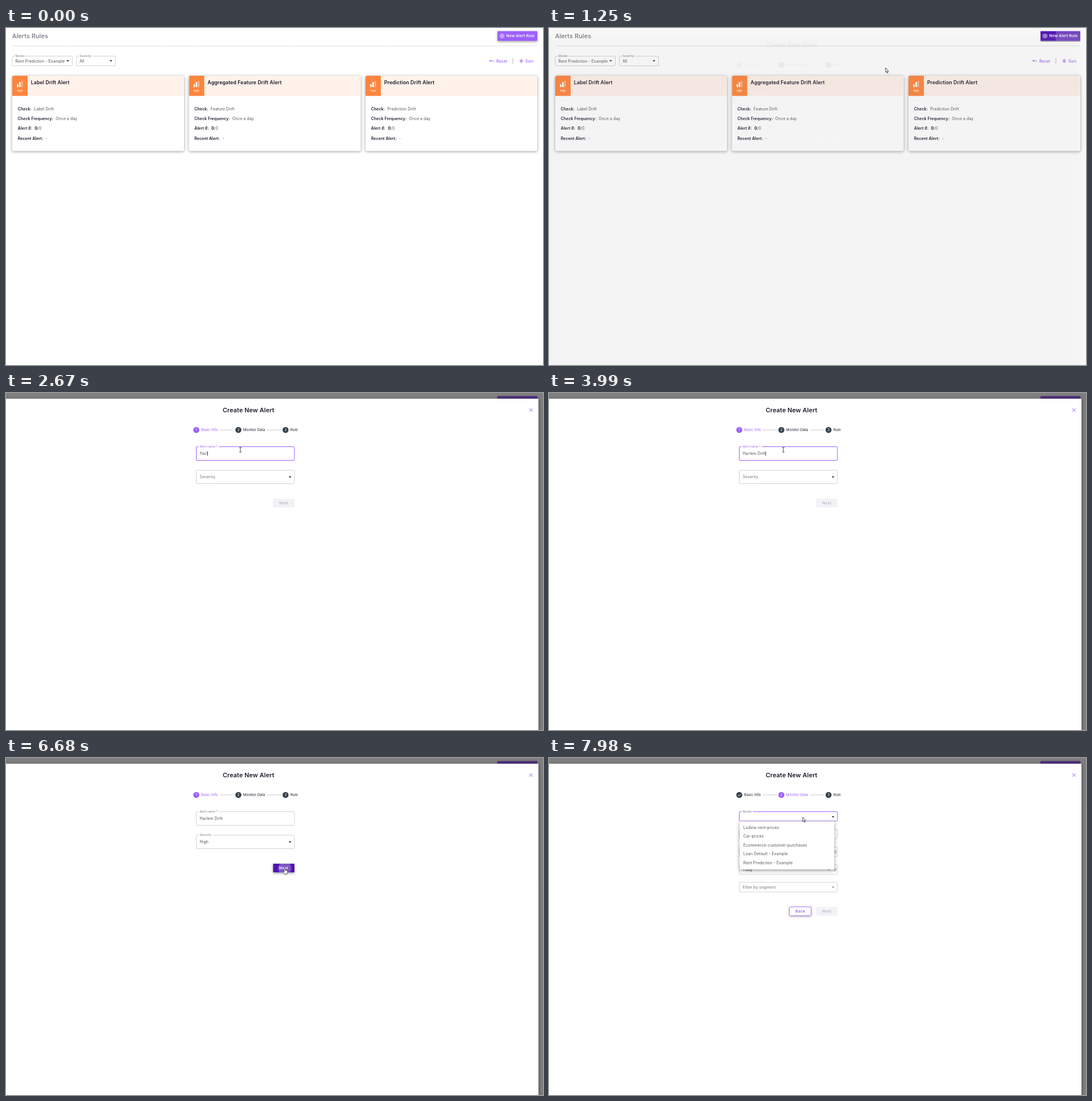
An HTML page with a canvas for the animation above (8 s loop, 944 px wide and 593 px high).

```html
<!DOCTYPE html>
<html lang="en">
<head>
<meta charset="utf-8">
<title>Alert rules</title>
<style>
html, body { margin: 0; width: 100%; height: 100%; overflow: hidden; background: #fff; }
canvas { display: block; }
</style>
</head>
<body>
<canvas id="stage" width="944" height="593"></canvas>
<script>
const ctx = document.getElementById('stage').getContext('2d');
const LOOP = 8000;
const PURPLE = '#9d60fb', DEEP = '#5014ae', INK = '#1f1b2d', BODY = '#55525c', MUTED = '#78747f', LINE = '#c9c7cd';

const progress = (t, start, length) => Math.min(1, Math.max(0, (t - start) / length));
const smooth = p => p * p * (3 - 2 * p);
const easeOut = p => 1 - (1 - p) ** 3;

// y is the middle of the capitals
function text(str, x, y, { size = 6.9, color = BODY, weight = 400, align = 'left', spacing = 0.1 } = {}) {
  ctx.font = `${weight} ${size}px Inter, sans-serif`;
  ctx.letterSpacing = spacing + 'px';
  ctx.textAlign = align;
  ctx.fillStyle = color;
  ctx.fillText(str, x, y + size * 0.365);
  return ctx.measureText(str).width;
}
function box(x, y, w, h, { fill, stroke, r = 1.5, line = 0.8, shadow = 0, drop = 1 } = {}) {
  ctx.save();
  ctx.beginPath();
  ctx.roundRect(x, y, w, h, r);
  if (shadow) {
    ctx.shadowColor = 'rgba(0,0,0,.4)';
    ctx.shadowBlur = shadow;
    ctx.shadowOffsetY = drop;
  }
  if (fill) { ctx.fillStyle = fill; ctx.fill(); }
  ctx.shadowColor = 'transparent';
  if (stroke) { ctx.strokeStyle = stroke; ctx.lineWidth = line; ctx.stroke(); }
  ctx.restore();
}
function path(d, x, y, { fill, stroke, line = 0.8 } = {}) {
  const shape = new Path2D(d);
  ctx.save();
  ctx.translate(x, y);
  if (fill) { ctx.fillStyle = fill; ctx.fill(shape); }
  if (stroke) { ctx.strokeStyle = stroke; ctx.lineWidth = line; ctx.stroke(shape); }
  ctx.restore();
}
function circle(x, y, r, style) { box(x - r, y - r, 2 * r, 2 * r, { r, ...style }); }
function caretDown(x, y, color = INK, up = false) {
  path(up ? 'M-2.4 1.2H2.4L0-1.2Z' : 'M-2.4-1.2H2.4L0 1.2Z', x, y, { fill: color });
}

// Solid button with hover shade and click ripple
function button(x, y, w, h, hover, ripple, shadow) {
  box(x, y, w, h, { fill: PURPLE, r: 1, shadow, drop: 1.5 });
  ctx.save();
  ctx.beginPath();
  ctx.rect(x, y, w, h);
  ctx.clip();
  ctx.globalAlpha *= hover;
  box(x, y, w, h, { fill: DEEP, r: 1 });
  ctx.restore();
  if (ripple && ripple.r > 0) {
    ctx.save();
    ctx.beginPath();
    ctx.rect(x, y, w, h);
    ctx.clip();
    ctx.globalAlpha *= ripple.alpha;
    circle(ripple.x, ripple.y, ripple.r, { fill: '#fff' });
    ctx.restore();
  }
}

function filter(x, w, label, value) {
  box(x, 49.5, w, 17, { stroke: LINE });
  box(x + 4, 48, label.length * 2.7 + 3, 3, { fill: '#fff', r: 0 });
  text(label, x + 5.5, 49.2, { size: 5.2, color: MUTED });
  text(value, x + 5.5, 58);
  caretDown(x + w - 8, 58);
}

function card(x, name, check) {
  box(x, 84, 302, 132.5, { fill: '#fff', r: 3, shadow: 5 });
  ctx.save();
  ctx.beginPath();
  ctx.roundRect(x, 84, 302, 132.5, 3);
  ctx.clip();
  box(x, 84, 302, 35.5, { fill: '#fff2ea', r: 0 });
  box(x, 84, 27, 35.5, { fill: '#ff853e', r: 0 });
  ctx.restore();
  box(x + 8.3, 99, 2.6, 5, { fill: '#fff', r: 0.6 });
  box(x + 12, 95, 2.8, 9, { fill: '#fff', r: 0.6 });
  box(x + 16, 93, 2.4, 11, { fill: '#ffb78f', r: 0.6 });
  text('high', x + 13.5, 110.3, { size: 4.2, color: '#fff', weight: 600, align: 'center' });
  text(name, x + 32.8, 95.5, { size: 8.75, color: INK, weight: 600 });
  [['Check:', check], ['Check Frequency:', 'Once a day'], ['Alert #:', '0'], ['Recent Alert:', '-']].forEach(([key, value], i) => {
    const y = 142.2 + i * 17.3;
    const left = x + 14.2 + text(key, x + 9.8, y, { color: INK, weight: 600 });
    const w = text(value, left, y, i === 2 ? { color: INK, weight: 700 } : {});
    if (i === 2) text('/0', left + w, y);
  });
}

function rulesPage(t) {
  box(0, 0, 944, 593, { fill: '#fff', r: 0 });
  text('Alerts Rules', 10.7, 14, { size: 10.9, color: MUTED, weight: 500 });
  ctx.setLineDash([1.6, 1]);
  path('M11 0H934', 0, 31.6, { stroke: '#bdbbc1', line: 0.7 });
  ctx.setLineDash([]);

  const hover = progress(t, 740, 160) * (1 - progress(t, 1240, 160));
  const ripple = { x: 928, y: 14, r: 73 * smooth(progress(t, 970, 550)), alpha: 0.2 * (1 - progress(t, 1250, 200)) };
  button(864, 5.5, 70, 17, hover, ripple, 4 * (1 - hover) + 0.5);
  circle(872, 14, 3.4, { stroke: '#fff', line: 0.9 });
  path('M-1.8 0H1.8M0-1.8V1.8', 872, 14, { stroke: '#fff', line: 0.9 });
  text('New Alert Rule', 879.6, 14, { size: 6.6, color: '#fff', weight: 600, spacing: 0.18 });

  filter(11, 105.5, 'Model', 'Rent Prediction - Example');
  filter(123.7, 68.8, 'Severity', 'All');
  path('M-3.2-2V.3H-.8M-3.2.3Q1-3 3.6 2', 854, 58, { stroke: PURPLE, line: 1 });
  text('Reset', 862, 58, { color: PURPLE, weight: 500 });
  path('M0-5V5', 891, 58, { stroke: '#aaa7b0' });
  path('M-2.4-.8L0-3.3L2.4-.8ZM-2.4.8L0 3.3L2.4.8Z', 905.8, 58, { stroke: PURPLE, line: 0.9 });
  text('Sort', 913, 58, { color: PURPLE, weight: 500 });

  card(11, 'Label Drift Alert', 'Label Drift');
  card(321.5, 'Aggregated Feature Drift Alert', 'Feature Drift');
  card(632, 'Prediction Drift Alert', 'Prediction Drift');
}

// raised: 0 puts the label inside the field, 1 on its top edge
function field(y, h, label, { value = '', raised = value ? 1 : 0, focus = false, labelColor = MUTED, arrow, up, fill } = {}) {
  box(334.5, y, 172.5, h, { stroke: focus ? PURPLE : LINE, fill, line: focus ? 1 : 0.8 });
  const size = 6.9 - 1.7 * raised;
  const middle = y + h / 2 + 0.2;
  if (raised > 0.9) {
    ctx.font = `400 ${size}px Inter, sans-serif`;
    ctx.letterSpacing = '.1px';
    box(338.5, y - 1, ctx.measureText(label).width + 4, 2, { fill: '#fff', r: 0 });
  }
  text(label, 340.4, middle + (y - 0.4 - middle) * raised, { size, color: labelColor });
  const w = value ? text(value, 340.4, middle) : 0;
  if (arrow) caretDown(499.3, middle, arrow, up);
  return 340.4 + w;
}

function stepper(second) {
  path('M376 0H400M459 0H483', 0, 65, { stroke: '#bdbdbd' });
  [[334.5, 'Basic Info'], [408.5, 'Monitor Data'], [491.4, 'Rule']].forEach(([x, label], i) => {
    const active = i === (second ? 1 : 0);
    circle(x, 65, 5.3, { fill: active ? PURPLE : '#35414b' });
    if (second && i === 0) path('M-2.4 0L-.7 1.8L2.5-1.7', x, 65, { stroke: '#fff', line: 1 });
    else text(i + 1, x, 65, { size: 6, color: '#fff', align: 'center', spacing: 0 });
    text(label, x + 8.6, 65.2, { size: 6.2, color: active ? PURPLE : INK, spacing: 0.05 });
  });
}

function menu(y, w, h, first, items, shades, open) {
  if (open <= 0) return;
  ctx.save();
  ctx.globalAlpha *= open;
  ctx.translate(335 + w / 2, y);
  ctx.scale(0.75 + 0.25 * open, 0.56 + 0.44 * open);
  ctx.translate(-335 - w / 2, -y);
  box(335, y, w, h, { fill: '#fff', shadow: 6, drop: 2 });
  items.forEach((item, i) => {
    const middle = first + 15.5 * i;
    if (shades[i]) box(335, middle - 8, w, 15.5, { fill: shades[i], r: 0 });
    text(item, 341.7, middle);
  });
  ctx.restore();
}

const NAME = 'Harlem Drift';
const KEY_TIMES = [2270, 2400, 2540, 2670, 2870, 3010, 3140, 3520, 3720, 3810, 3900, 3990];

function disabledNext(y) {
  box(469.5, y, 37.5, 15.2, { fill: '#f3f2f6', r: 1 });
  text('Next', 488.4, y + 7.8, { size: 6.6, color: '#b8b5c0', weight: 600, align: 'center', spacing: 0.3 });
}

function basicInfo(t) {
  const nameFocus = t >= 1740 && t < 4900;
  const typed = NAME.slice(0, KEY_TIMES.filter(k => k <= t).length);
  const end = field(94.5, 24, 'Alert name *', {
    value: typed, raised: easeOut(progress(t, 1740, 200)), focus: nameFocus, labelColor: nameFocus ? PURPLE : MUTED
  });
  if (nameFocus) path('M0-4V4', end + 0.3, 106.5, { stroke: INK, line: 0.7 });

  const chosen = t >= 5640;
  const menuOpen = t >= 4950 && !chosen;
  field(136, 23.5, 'Severity', {
    value: chosen ? 'High' : '', raised: easeOut(progress(t, 4950, 200)),
    focus: t >= 4950 && t < 6400, arrow: INK, up: menuOpen
  });

  if (chosen) {
    const ripple = { x: 490, y: 194, r: 22.5 * smooth(progress(t, 6400, 550)), alpha: 0.27 };
    button(469.5, 186, 37.5, 15.2, progress(t, 6300, 200), ripple, 4);
    text('Next', 488.4, 193.8, { size: 6.6, color: '#fff', weight: 600, align: 'center', spacing: 0.3 });
  } else disabledNext(186);

  const shades = ['#dedede', t > 5310 && t < 5480 ? '#f4f4f4' : '', t > 5430 ? '#f4f4f4' : ''];
  const open = chosen ? 1 - progress(t, 5640, 200) : easeOut(progress(t, 4950, 300));
  menu(162, 173, 67, 170.5, ['Low', 'Mid', 'High', 'Critical'], shades, open);
}

function monitorData(t) {
  const opened = t >= 7600;
  field(94.5, 16.5, 'Model', { raised: easeOut(progress(t, 7600, 200)), focus: opened, arrow: INK, up: opened });
  field(125.5, 16.5, 'Check', { arrow: MUTED });
  [['Frequency', 156.7], ['Aggregation window', 187.9]].forEach(([label, y]) => {
    field(y, 17, label, { value: '1 day' });
    circle(502.5, y + 8.5, 2.5, { stroke: MUTED, line: 0.7 });
    path('M0-1.4V0H1', 502.5, y + 8.5, { stroke: MUTED, line: 0.7 });
    path('M-1.6-1.6L1.6 1.6M1.6-1.6L-1.6 1.6', 492, y + 8.5, { stroke: MUTED });
  });
  field(218.8, 17, 'Filter by segment', { arrow: '#8d8a93' });
  box(422.7, 262, 38, 15.5, { fill: '#fff', stroke: PURPLE, r: 1, shadow: 4 });
  text('Back', 441.8, 269.8, { size: 6.6, color: PURPLE, weight: 600, align: 'center', spacing: 0.3 });
  disabledNext(262);
  const models = ['Lodvia-rent-prices', 'Car-prices', 'Ecommerce-customer-purchases', 'Loan Default - Example', 'Rent Prediction - Example'];
  menu(111.5, 166.5, 84.5, 122.2, models, [], easeOut(progress(t, 7600, 300)));
}

function dialog(t) {
  const shown = smooth(progress(t, 1210, 300));
  if (!shown) return;
  ctx.save();
  ctx.globalAlpha = shown;
  box(0, 0, 944, 593, { fill: 'rgba(0,0,0,.5)', r: 0 });
  box(-10, 10, 946, 600, { fill: '#fff', r: 1, shadow: 6, drop: 2 });
  text('Create New Alert', 381, 30, { size: 10.8, color: INK, weight: 600 });
  path('M-3-3L3 3M3-3L-3 3', 922.7, 30, { stroke: PURPLE, line: 1 });
  const second = t >= 6840;
  stepper(second);
  (second ? monitorData : basicInfo)(t);
  ctx.restore();
}

const TRACK = [
  [130, 633, 567], [820, 928, 14], [1010, 928, 14], [1410, 412, 100], [4520, 412, 100], [4820, 374, 150],
  [5200, 374, 150], [5270, 372, 172], [5400, 371.5, 194.5], [5480, 371, 200], [6180, 371, 200], [6380, 490, 193.5],
  [7110, 490, 193.5], [7500, 449, 102], [7979, 449, 102], [7980, 446, 104]
];
const POINTERS = [
  [130, 'arrow'], [780, 'hand'], [1030, 'arrow'], [1400, 'beam'], [4620, 'arrow'], [4700, 'hand'],
  [6220, 'arrow'], [6340, 'hand'], [7180, 'arrow'], [7440, 'hand'], [7980, 'arrow']
];
const SHAPES = {
  arrow: 'M0 0V8L1.8 6.4L3.1 9.2L4.2 8.7L3 6H5.2Z',
  hand: 'M-1 .8Q0-.8 1 .8V4L4 4.6Q5 5 5 6V8Q4.8 9.5 4 10.8H-.6L-3.2 7.2Q-3.4 5.8-2.2 6L-1 7Z',
  beam: 'M-2-4H2M0-4V4M-2 4H2'
};

function pointer(t) {
  if (t < TRACK[0][0]) return;
  const i = TRACK.findLastIndex(k => k[0] <= t);
  const [t0, x0, y0] = TRACK[i];
  const [t1, x1, y1] = TRACK[i + 1] || [LOOP, x0, y0];
  const p = smooth(progress(t, t0, t1 - t0));
  const kind = POINTERS.findLast(k => k[0] <= t)[1];
  path(SHAPES[kind], x0 + (x1 - x0) * p, y0 + (y1 - y0) * p, { fill: '#fff', stroke: '#222', line: 0.8 });
}

function draw(now) {
  const t = now % LOOP;
  ctx.clearRect(0, 0, 944, 593);
  rulesPage(t);
  dialog(t);
  pointer(t);
  requestAnimationFrame(draw);
}
requestAnimationFrame(draw);
</script>
</body>
</html>
```
